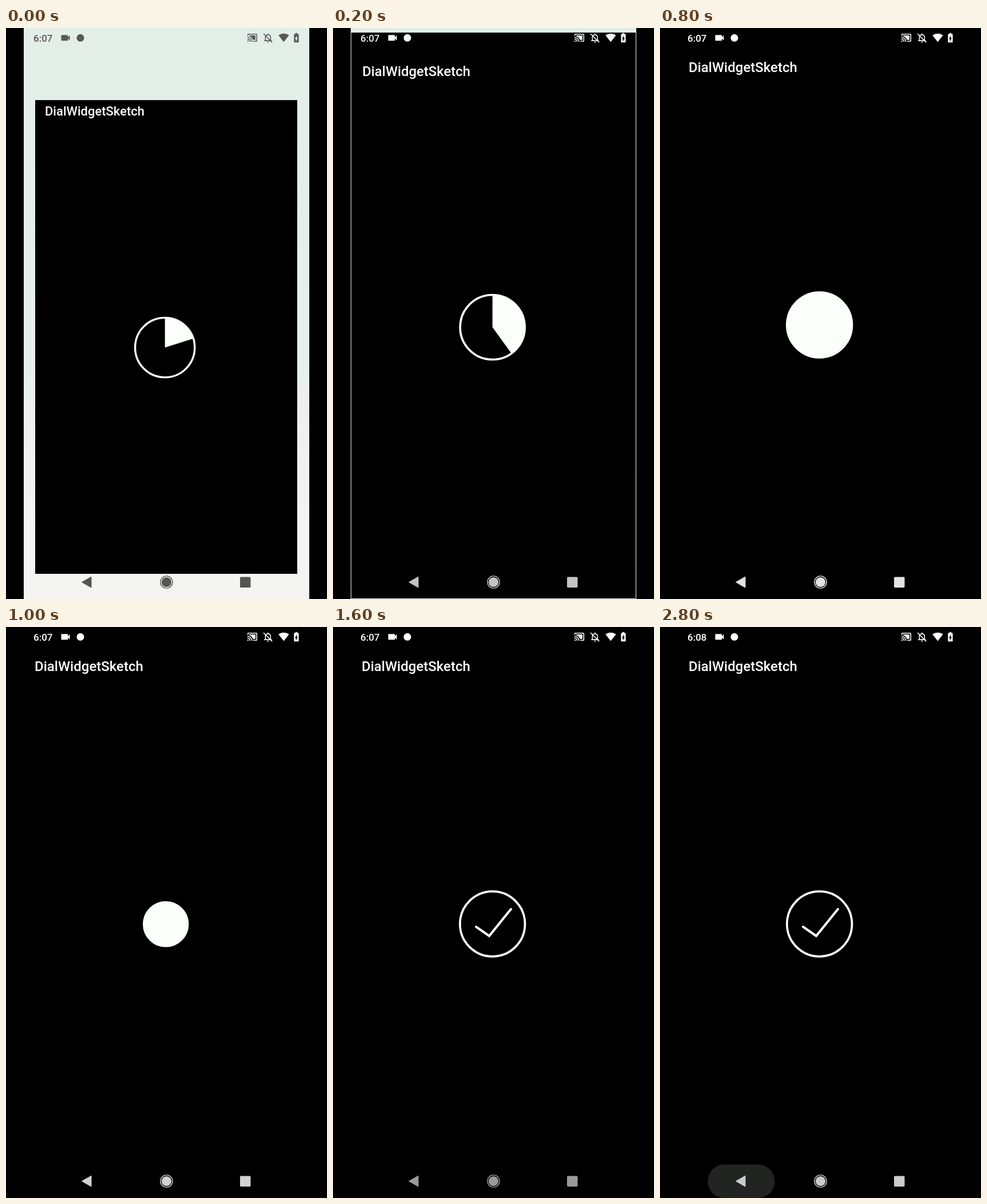
Write an HTML page that moves like this. It is 561x998 px and loops after 2900 ms.

```html
<!DOCTYPE html>
<html lang="en">
<head>
<meta charset="utf-8">
<title>Pie progress</title>
<style>
  html, body { margin: 0; width: 100%; height: 100%; overflow: hidden; background: #000; }
  svg { display: block; width: 100%; height: 100%; }
  text { font-family: Roboto, "Open Sans", sans-serif; font-weight: 500; }
</style>
</head>
<body>
<svg viewBox="0 0 561 998">
  <defs>
    <linearGradient id="paper" x2="0" y2="1">
      <stop offset="0" stop-color="#e3eee9"/>
      <stop offset=".6" stop-color="#e8efeb"/>
      <stop offset=".75" stop-color="#f1f1ed"/>
      <stop offset="1" stop-color="#f4f4f0"/>
    </linearGradient>
  </defs>
  <rect width="561" height="998"/>
  <rect id="wall" x="31" width="499" height="998" fill="url(#paper)"/>
  <rect id="win"/>

  <g id="content">
    <text x="50" y="77.3" font-size="24" fill="#fff">DialWidgetSketch</text>
    <g id="dial" fill="none" stroke="#fff" stroke-width="3.7">
      <circle id="pie" r="28.5" pathLength="1" stroke="#fafffa" stroke-width="57" transform="rotate(-90)"/>
      <circle r="56.8"/>
      <path id="check" d="M-28.7 5 -5.7 21 32.3-26" stroke-width="4" stroke-linecap="round"/>
    </g>
  </g>

  <g id="status">
    <text id="clock" x="48" y="23.5" font-size="17"></text>
    <path transform="translate(94 7.3) scale(.83)" d="M17 10.5V7c0-.55-.45-1-1-1H4c-.55 0-1 .45-1 1v10c0 .55.45 1 1 1h12c.55 0 1-.45 1-1v-3.5l4 4v-11l-4 4z"/>
    <circle cx="130" cy="17.3" r="6.5"/>
    <path transform="translate(421.1 7.6) scale(.78)" d="M1 18v3h3c0-1.66-1.34-3-3-3zm0-4v2c2.76 0 5 2.24 5 5h2c0-3.87-3.13-7-7-7zm18-7H5v1.63c3.96 1.28 7.09 4.41 8.37 8.37H19V7zM1 10v2c4.97 0 9 4.03 9 9h2c0-6.08-4.93-11-11-11zm20-7H3c-1.1 0-2 .9-2 2v3h2V5h18v14h-7v2h7c1.1 0 2-.9 2-2V5c0-1.1-.9-2-2-2z"/>
    <g transform="translate(448 7.5) scale(.82)">
      <path d="M6.5 17V11c0-3.4 2.2-5.5 5.5-5.5s5.5 2.1 5.5 5.5v6M4 17.8h16M12 5V2.5M2.5 3 21 21.5" fill="none" stroke-width="1.9"/>
      <path d="M10 20h4a2 2 0 0 1-4 0z"/>
    </g>
    <path transform="translate(475.8 7.6) scale(.8)" d="M12 21 .5 6.5C4 3.8 8 2.6 12 2.6s8 1.2 11.5 3.9z"/>
    <path transform="translate(497.5 7.1) scale(.83)" d="M15.67 4H14V2h-4v2H8.33C7.6 4 7 4.6 7 5.33v15.33C7 21.4 7.6 22 8.33 22h7.33c.74 0 1.34-.6 1.34-1.33V5.33C17 4.6 16.4 4 15.67 4zM11 20v-5.5H9L13 7v5.5h2L11 20z"/>
  </g>

  <rect id="ripple" x="83.5" y="939.5" width="117" height="58.5" rx="29" fill="#222422"/>
  <g id="nav">
    <path d="M149 959.2v18.8l-16.4-9.4z" stroke-width="1" stroke-linejoin="round"/>
    <circle cx="280.5" cy="968.5" r="8.6"/>
    <circle cx="280.5" cy="968.5" r="10.6" fill="none" stroke-width="1.4"/>
    <rect x="409" y="959.5" width="18.5" height="18.5" rx="1.8"/>
  </g>
</svg>
<script>
const LOOP = 2900, STEP = 100;
const $ = id => document.getElementById(id);
const set = (id, attrs) => {
  for (const k in attrs) $(id).setAttribute(k, attrs[k]);
};

// Linear interpolation through [time, value] stops.
function mix(t, stops) {
  const i = stops.findIndex(s => s[0] > t);
  if (i < 0) return stops[stops.length - 1][1];
  if (i === 0) return stops[0][1];
  const [t0, a] = stops[i - 1], [t1, b] = stops[i];
  return a + (b - a) * (t - t0) / (t1 - t0);
}
// The opening settles one value per step, then rests at the last.
const settle = (t, ...values) => mix(t, values.map((v, i) => [i * STEP, v]));

function paint(id, level) {
  const v = Math.round(level), c = `rgb(${v},${v},${v})`;
  set(id, { fill: c });
  for (const el of $(id).querySelectorAll("[stroke-width]")) el.setAttribute("stroke", c);
}

function draw(t) {
  const left = settle(t, 51, 36, 32, 31), right = settle(t, 509, 525, 529, 530);
  const top = settle(t, 126, 33, 8, 2, 0), bottom = settle(t, 954, 993, 997, 998);
  set("win", { x: left, y: top, width: right - left, height: bottom - top });
  set("wall", { visibility: t < 400 ? "visible" : "hidden" });

  const zoom = settle(t, .917, .979, .995, .999, 1);
  const cx = settle(t, 278, 279), cy = settle(t, 558.5, 532.5, 523, 520, 519);
  set("content", { transform: `translate(${cx} ${cy}) scale(${zoom}) translate(-279 -519)` });

  // The full disc shrinks towards the screen centre, then grows back as a ring with a check.
  const phase = Math.min(2, Math.max(0, (t - 867) / 350));
  const size = (1 + Math.cos(Math.PI * phase)) / 2;
  set("dial", { transform: `translate(280.5 520.5) scale(${size}) translate(-1.8 -1.5)` });
  set("pie", {
    "stroke-dasharray": `${Math.min(1, .2 + t / 1000)} 1`,
    visibility: phase < 1 ? "visible" : "hidden"
  });
  set("check", { visibility: phase < 1 ? "hidden" : "visible" });

  $("clock").textContent = t < 2200 ? "6:07" : "6:08";
  paint("status", settle(t, 88, 203, 245, 255));
  paint("nav", mix(t, [[0, 85], [100, 143], [200, 195], [300, 235], [400, 255],
    [500, 255], [1600, 154], [2600, 154], [2800, 203]]));
  set("ripple", { opacity: mix(t, [[2600, 0], [2800, 1]]) });
}

const start = performance.now();
function tick() {
  const t = (performance.now() - start) % LOOP;
  draw(Math.floor(t / STEP) * STEP);
  requestAnimationFrame(tick);
}
tick();
</script>
</body>
</html>
```
